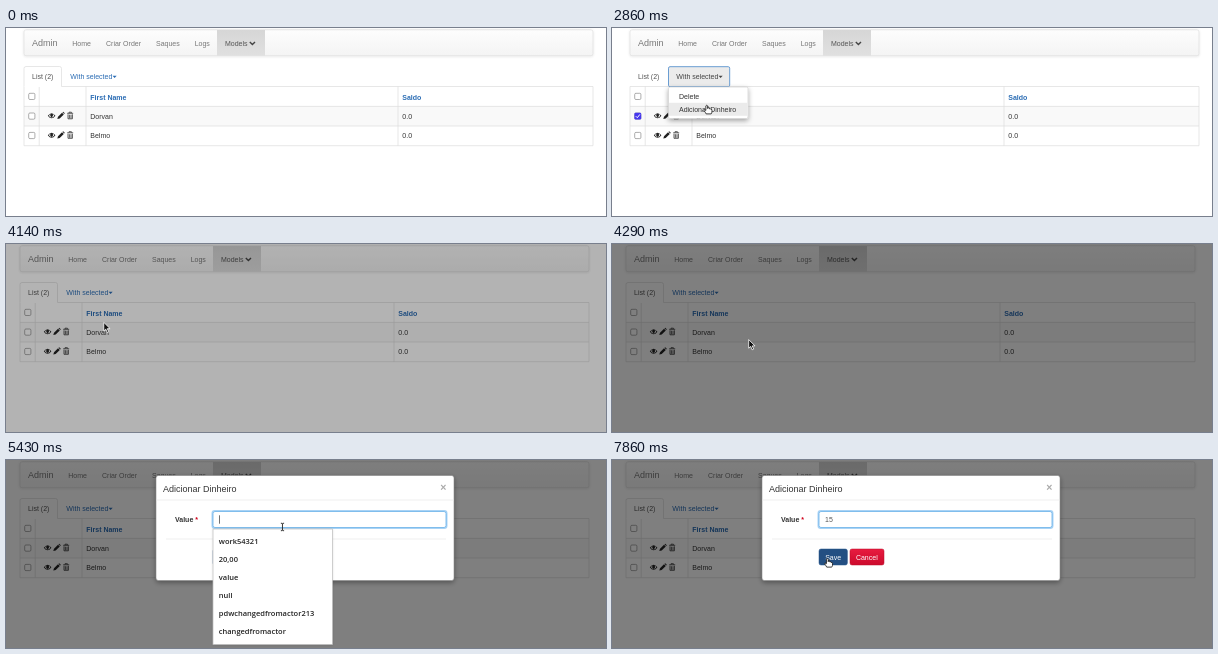
Write an HTML page that moves like this. It is 600x188 px and loops after 8000 ms.

```html
<!DOCTYPE html>
<html lang="pt">
<head>
<meta charset="utf-8">
<title>Admin</title>
<style>
html, body { margin: 0; width: 100%; height: 100%; overflow: hidden; background: #fff; }
svg { display: block; width: 600px; height: 188px; font: 7px "Liberation Sans", Arial, sans-serif; fill: #333; }
.b { font-weight: bold; }
.big { font-size: 9px; }
.nav { fill: #777; }
.link { fill: #2a6cb4; }
.line { fill: none; stroke: #ddd; stroke-width: .7; }
.box { fill: #fff; stroke: #767676; stroke-width: .6; }
.pop { font: 600 7.5px "Open Sans", "Noto Sans", sans-serif; fill: #222; }
.white { fill: #fff; }
</style>
</head>
<body>
<svg viewBox="0 0 600 188">
  <defs>
    <linearGradient id="bar" x2="0" y2="1"><stop stop-color="#fdfdfd"/><stop offset="1" stop-color="#f4f4f4"/></linearGradient>
    <linearGradient id="active" x2="0" y2="1"><stop stop-color="#d6d6d6"/><stop offset="1" stop-color="#e0e0e0"/></linearGradient>
    <linearGradient id="blue" x2="0" y2="1"><stop stop-color="#3570b2"/><stop offset="1" stop-color="#285690"/></linearGradient>
    <linearGradient id="red" x2="0" y2="1"><stop stop-color="#e81c40"/><stop offset="1" stop-color="#cc0a2c"/></linearGradient>
    <filter id="soft" x="-20%" y="-20%" width="140%" height="150%"><feDropShadow dx="0" dy="2" stdDeviation="2.5" flood-opacity=".35"/></filter>
    <filter id="faint" x="-5%" y="-20%" width="110%" height="150%"><feDropShadow dx="0" dy=".5" stdDeviation="1" flood-opacity=".12"/></filter>
    <g id="icons">
      <path d="M41.8 0Q45.6-5 49.4 0Q45.6 5 41.8 0Z" fill="#222"/>
      <path d="M43 .2Q43.3-1.2 44.3-1.7Q43.6 1 45.6 1.7Q47.6 1 46.9-1.7Q47.9-1.2 48.2.2Q45.6 3.3 43 .2Z" fill="#fff"/>
      <path d="M51.3 3.4L52 1L56-3L57.8-1.2L53.7 2.7ZM56.5-3.4L57.2-4L58.8-2.4L58.2-1.7Z" fill="#222"/>
      <path d="M61.2-2.4H67.2M63-2.6V-3.5H65.4V-2.6M62-1.4V3.1H66.4V-1.4M63.4-1V2.6M65-1V2.6" fill="none" stroke="#333" stroke-width=".8"/>
    </g>
  </defs>

  <g id="page">
    <rect x="18" y="1.8" width="569" height="26" rx="2" fill="url(#bar)" stroke="#dedede" stroke-width=".7" filter="url(#faint)"/>
    <rect x="211" y="2" width="48" height="25.7" fill="url(#active)"/>
    <g class="nav">
      <text class="big" x="26" y="18.2">Admin</text>
      <text x="66.3" y="17.6">Home</text>
      <text x="100" y="17.6">Criar Order</text>
      <text x="150" y="17.6">Saques</text>
      <text x="188.7" y="17.6">Logs</text>
      <text x="219" y="17.6" fill="#555">Models</text>
    </g>
    <path d="M243.8 13.9L246.4 16.5L249 13.9" fill="none" stroke="#444" stroke-width="1.4"/>

    <rect id="row0" x="18" y="78.5" width="569" height="19.5"/>
    <rect id="row1" x="18" y="98" width="569" height="19.5"/>
    <path class="line" d="M18 58.5H587V117.7H18ZM18 78.4H587M18 98H587M33.2 58.5V117.7M80 58.5V117.7M392 58.5V117.7"/>
    <path id="tab" class="line" style="fill:#fff" d="M18 58.5V40.5Q18 38.5 20 38.5H53.5Q55.5 38.5 55.5 40.5V58.5"/>
    <path id="tabGap" d="M18.5 58.5H55.2" stroke="#fff" stroke-width="1"/>
    <rect id="toggle" x="56.5" y="38.7" width="61.2" height="20" rx="1.5" fill="#ebebeb" stroke="#5b94cf" stroke-width=".9"/>
    <text x="26" y="51.1" fill="#555">List (2)</text>
    <g id="selectLink"><text x="64.3" y="51.1">With selected</text><path d="M106.5 47.8H110.7L108.6 50Z"/></g>

    <rect class="box" x="22.7" y="65.3" width="6.2" height="6.2" rx="1.2"/>
    <rect class="box" x="22.7" y="85" width="6.2" height="6.2" rx="1.2"/>
    <rect class="box" x="22.7" y="104.4" width="6.2" height="6.2" rx="1.2"/>
    <g id="check"><rect x="22.4" y="84.7" width="6.8" height="6.8" rx="1.2" fill="#4637ee"/><path d="M23.8 88.2L25.3 89.7L27.9 86.4" fill="none" stroke="#fff" stroke-width="1"/></g>
    <use href="#icons" y="87.7"/>
    <use href="#icons" y="107.2"/>
    <g class="b link"><text x="84.3" y="71.6">First Name</text><text x="396.3" y="71.6">Saldo</text></g>
    <text x="84.3" y="90.5">Dorvan</text><text x="396.3" y="90.5">0.0</text>
    <text x="84.3" y="110">Belmo</text><text x="396.3" y="110">0.0</text>

    <g id="menu">
      <rect x="56.5" y="59" width="79.5" height="31.5" rx="1.5" fill="#fff" stroke="#ccc" stroke-width=".6" filter="url(#soft)"/>
      <rect id="itemHover" x="57" y="74.8" width="78.6" height="13" fill="#ebebeb"/>
      <text x="67" y="70.8">Delete</text>
      <text x="67" y="83.8">Adicionar Dinheiro</text>
    </g>
  </g>

  <rect id="backdrop" width="600" height="188" fill="#000"/>

  <g id="modal">
    <rect x="150" y="15.5" width="298" height="105" rx="2.5" fill="#fff" stroke="#777" stroke-width=".5" filter="url(#soft)"/>
    <text class="big" x="157" y="32">Adicionar Dinheiro</text>
    <text class="b" x="434.2" y="31" font-size="10.5" fill="#aaa">×</text>
    <path class="line" style="stroke:#e8e8e8" d="M150.3 40H447.7M160 79H440"/>
    <text class="b" x="169" y="62">Value</text>
    <text class="b" x="189.3" y="62" fill="#d0021b">*</text>
    <rect id="glow" x="206.3" y="50.8" width="234.4" height="17.4" rx="2.4" fill="none" stroke="#a9d3f5" stroke-width="1.6"/>
    <rect id="field" x="207" y="51.5" width="233" height="16" rx="2" fill="#fff" stroke-width=".8"/>
    <text id="value" x="213" y="62" fill="#555"></text>
    <rect id="caret" y="55.3" width=".7" height="8.4" fill="#333"/>
    <rect id="save" x="207" y="89" width="28.4" height="16" rx="2" stroke="#24548a" stroke-width=".5"/>
    <rect x="238" y="89" width="34" height="16" rx="2" fill="url(#red)" stroke="#b80c2a" stroke-width=".5"/>
    <g class="white"><text x="213.2" y="99.6">Save</text><text x="243.9" y="99.6">Cancel</text></g>
  </g>

  <g id="popup" class="pop">
    <rect x="207" y="69" width="119.5" height="115.5" fill="#fff" stroke="#bbb" stroke-width=".7" filter="url(#faint)"/>
  </g>

  <g id="cursor" stroke-linejoin="round">
    <path id="arrow" d="M0 0V8.6L2 6.8L3.5 10.2L5 9.5L3.5 6.3H6.3Z" fill="#111" stroke="#fff" stroke-width=".8"/>
    <path id="hand" d="M-.9.8Q0-.6.9.8V3.4Q2-.1 2.5 3.7Q3.5 3 4 4.2Q5.2 3.9 5.2 5.2V7Q5 8 4.4 8.8H-.6Q-1.2 7.5-2.8 5.4Q-2.9 4.1-.9 5.3Z" fill="#fff" stroke="#111" stroke-width=".8"/>
    <path id="beam" d="M-1.6-3.7H-.4L0-3.3L.4-3.7H1.6M0-3.3V3.3M-1.6 3.7H-.4L0 3.3L.4 3.7H1.6" fill="none" stroke="#222" stroke-width=".9"/>
  </g>
</svg>
<script>
const LOOP = 8000, STEP = 1000 / 7;
const $ = id => document.getElementById(id);
const show = (id, on) => $(id).style.display = on ? '' : 'none';
const set = (id, name, value) => $(id).setAttribute(name, value);
const clamp = x => Math.max(0, Math.min(1, x));

['work54321', '20,00', 'value', 'null', 'pdwchangedfromactor213', 'changedfromactor'].forEach((label, i) => {
  const text = document.createElementNS('http://www.w3.org/2000/svg', 'text');
  text.setAttribute('x', 212.8);
  text.setAttribute('y', 84 + i * 18);
  text.textContent = label;
  $('popup').append(text);
});

// time, x, y of the pointer
const path = [
  [140, 250, 172], [430, 190, 140], [1000, 27, 88], [1290, 26, 87], [1570, 44, 81],
  [2140, 88, 50], [2430, 90, 48], [2860, 94.8, 77.3], [3570, 95, 78], [4140, 97, 78],
  [4430, 176, 113], [5000, 270, 62], [5430, 276.5, 67], [6570, 276.5, 67],
  [6860, 296, 95], [7140, 270, 119], [7570, 216, 100], [7860, 215.3, 98.3]
];

function pointer(t) {
  const i = path.findIndex(p => p[0] >= t);
  if (i < 0) return path.at(-1).slice(1);
  if (i === 0) return path[0].slice(1);
  const [t0, x0, y0] = path[i - 1], [t1, x1, y1] = path[i];
  const k = (t - t0) / (t1 - t0);
  return [x0 + (x1 - x0) * k, y0 + (y1 - y0) * k];
}

// CSS ease-out: cubic-bezier(0, 0, .58, 1)
function easeOut(x) {
  let lo = 0, hi = 1;
  for (let i = 0; i < 20; i++) {
    const s = (lo + hi) / 2;
    if (1.74 * s * s * (1 - s) + s ** 3 < x) lo = s; else hi = s;
  }
  return 3 * lo * lo - 2 * lo ** 3;
}

function draw(t) {
  const [x, y] = pointer(t);
  const menu = t >= 2425 && t < 3565, opened = t >= 4000;
  set('page', 'transform', `translate(${opened ? -4 : 0})`);
  set('backdrop', 'opacity', .5 * clamp((t - 4053) / 150));

  const hover = t >= 140 && !menu && !opened;
  set('row0', 'fill', hover && y > 78.5 && y < 98 ? '#f3f3f3' : '#f9f9f9');
  set('row1', 'fill', hover && y >= 98 && y < 117.5 ? '#f3f3f3' : '#fff');
  show('check', t >= 1280 && t < 3565);
  show('menu', menu);
  show('toggle', menu);
  show('tab', !menu);
  show('tabGap', !menu);
  show('itemHover', y > 74.8);
  set('selectLink', 'fill', menu ? '#444' : '#2a6cb4');

  const age = t - 4290;
  show('modal', age > -5);
  set('modal', 'opacity', clamp(age / 150));
  set('modal', 'transform', `translate(0 ${-26 * (1 - easeOut(clamp(age / 300)))})`);

  const focus = t >= 4995;
  show('glow', focus);
  set('field', 'stroke', focus ? '#66afe9' : '#ccc');
  const typed = t < 5850 ? '' : t < 6135 ? '1' : '15';
  $('value').textContent = typed;
  const since = t - (t < 5850 ? 4995 : t < 6135 ? 5850 : 6135);
  show('caret', focus && since % 1000 < 500);
  set('caret', 'x', 213.2 + typed.length * 3.9);
  show('popup', t >= 5280 && t < 5850);

  const onSave = t > 7300 && x > 207 && x < 235.4 && y > 89 && y < 105;
  set('save', 'fill', onSave ? '#234f82' : 'url(#blue)');

  const onLink = !opened && t > 1600 && x > 57 && y < 59;
  const hand = menu || onLink || onSave;
  const beam = t > 4500 && x > 207 && y > 51 && y < 68;
  show('cursor', t >= 140);
  set('cursor', 'transform', `translate(${x} ${y})`);
  show('hand', hand);
  show('beam', beam);
  show('arrow', !hand && !beam);
}

const start = performance.now();
function tick() {
  const t = (performance.now() - start) % LOOP;
  draw(Math.floor((t + 3) / STEP) * STEP % LOOP);
  requestAnimationFrame(tick);
}
tick();
</script>
</body>
</html>
```
